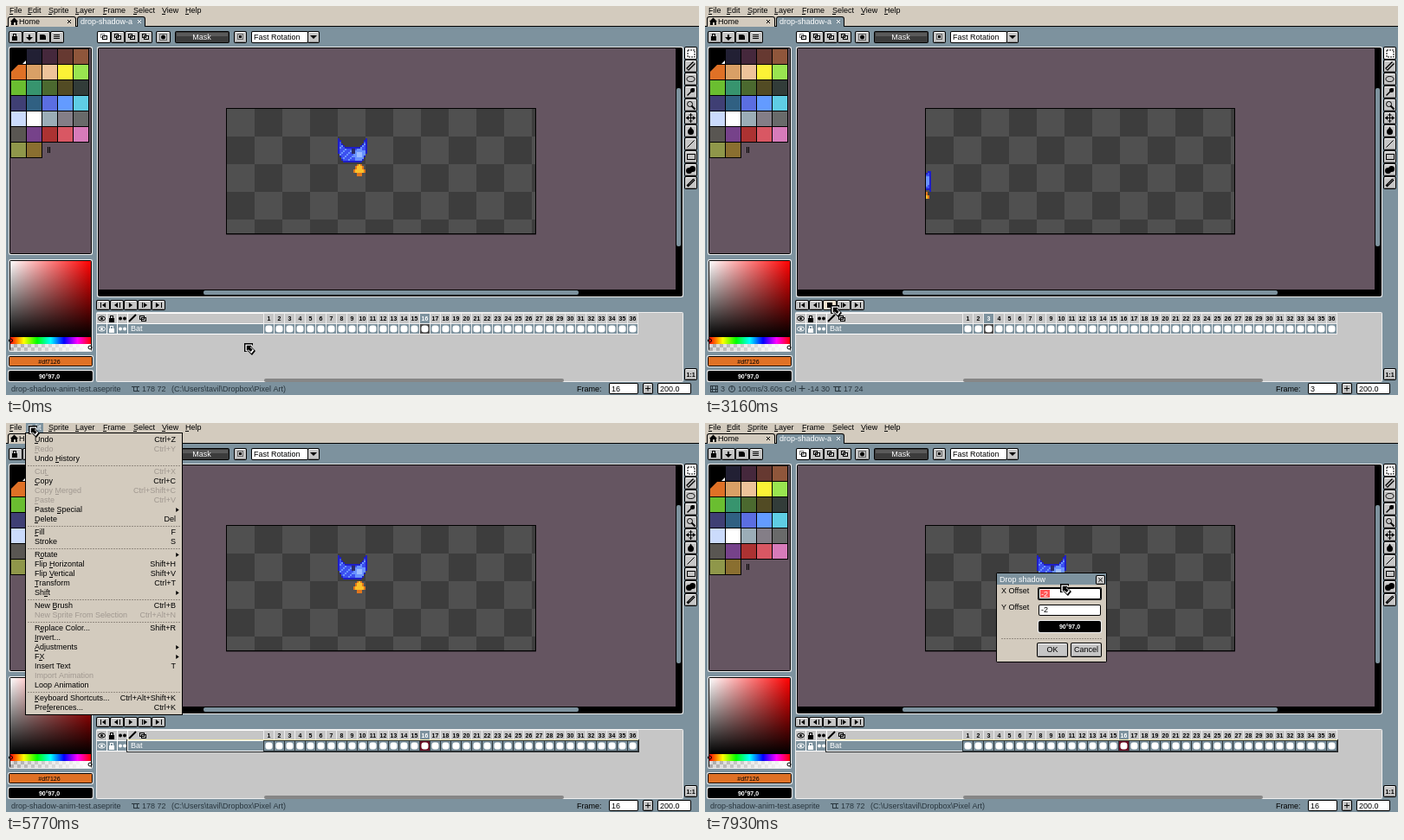
An HTML page with a canvas that plays this animation: 800x450 px, repeating every 7990 ms.

```html
<!DOCTYPE html>
<html lang="en">
<head>
<meta charset="utf-8">
<title>Pixel editor: drop shadow</title>
<style>
html, body { margin: 0; width: 100%; height: 100%; overflow: hidden; background: #7d929e; }
canvas { display: block; width: 800px; height: 450px; }
</style>
</head>
<body>
<canvas id="stage" width="800" height="450"></canvas>
<script>
const LOOP = 7990, PLAY = 998, STOP = 4385, BEAT = 96.6, SELECT = 4850;
const MENU_OPEN = 5560, SUB_OPEN = 6440, MENU_CLOSE = 7200, DIALOG = 7430;
const BLUE = '#7d929e', FACE = '#d3cbbe', GRAY = '#c6c6c6', PLUM = '#655561', INK = '#000', WHITE = '#fff';
const ctx = document.getElementById('stage').getContext('2d');

// Drawing helpers
const mix = (a, b, k) => a + (b - a) * k;
const times = (n, f) => { for (let i = 0; i < n; i++) f(i); };
const rect = (x, y, w, h, c = INK) => { ctx.fillStyle = c; ctx.fillRect(x, y, w, h); };
function text(s, x, y, c = INK, size = 9, align = 'left', weight = '') {
  ctx.font = `${weight} ${size}px "Liberation Sans", Arial, sans-serif`;
  ctx.textAlign = align;
  ctx.fillStyle = c;
  ctx.fillText(s, x, y);
  return ctx.measureText(s).width;
}
const tiny = (s, x, y, c) => text(s, x, y, c, 7, 'center', 'bold');
function round(x, y, w, h, r, c = INK) {
  ctx.fillStyle = c;
  ctx.beginPath();
  ctx.roundRect(x, y, w, h, r);
  ctx.fill();
}
// Raised button
function box(x, y, w, h, face = GRAY) {
  round(x, y, w, h, 2);
  round(x + 1, y + 1, w - 2, h - 2, 1, face);
  if (face === GRAY) {
    rect(x + 2, y + 1, w - 4, 1, WHITE);
    rect(x + 2, y + h - 2, w - 4, 1, '#8c8c8c');
  }
}
// Sunken area: light edge, black edge, content
function well(x, y, w, h, c) {
  round(x, y, w, h, 2, '#eee');
  round(x + 1, y + 1, w - 2, h - 2, 2);
  rect(x + 2, y + 2, w - 4, h - 4, c);
}
function trace(pts) {
  ctx.beginPath();
  for (let i = 0; i < pts.length; i += 2) ctx.lineTo(pts[i], pts[i + 1]);
}
function line(x1, y1, x2, y2, c = INK, w = 1) {
  trace([x1, y1, x2, y2]);
  ctx.strokeStyle = c;
  ctx.lineWidth = w;
  ctx.stroke();
}
function fill(pts, c = INK) { trace(pts); ctx.fillStyle = c; ctx.fill(); }
function oval(x, y, rx, ry, c, hollow) {
  ctx.beginPath();
  ctx.ellipse(x, y, rx, ry, 0, 0, 7);
  ctx.fillStyle = ctx.strokeStyle = c;
  ctx.lineWidth = 1;
  hollow ? ctx.stroke() : ctx.fill();
}
const dot = (x, y, r, c = INK) => oval(x, y, r, r, c);
const ring = (x, y, r, c = INK) => oval(x, y, r, r, c, true);
function frame(x, y, w, h, c = INK, dash = []) {
  ctx.strokeStyle = c;
  ctx.lineWidth = 1;
  ctx.setLineDash(dash);
  ctx.strokeRect(x + .5, y + .5, w - 1, h - 1);
  ctx.setLineDash([]);
}
function gradient(x, y, w, h, across, colors) {
  const g = ctx.createLinearGradient(x, y, across ? x + w : x, across ? y : y + h);
  colors.forEach((c, i) => g.addColorStop(i / (colors.length - 1), c));
  rect(x, y, w, h, g);
}
const dashes = (x, y, w) => times(w / 3, i => rect(x + 3 * i, y, 2, 1, '#948c82'));
// Triangle pointing right (d = 1) or left (d = -1)
const tri = (x, y, r, d = 1, c = INK) => fill([x - r * d * .7, y - r, x + r * d * .7, y, x - r * d * .7, y + r], c);
const drop = (x, y) => fill([x - 4, y, x + 4, y, x, y + 4]);
function plus(x, y, r, c = INK) {
  line(x - r, y, x + r, y, c);
  line(x, y - r, x, y + r, c);
}
function cross(x, y, c = INK) {
  line(x - 2, y - 2, x + 2, y + 2, c);
  line(x + 2, y - 2, x - 2, y + 2, c);
}

// Motion
const isPlaying = t => t >= PLAY && t < STOP;
const frameAt = t => isPlaying(t) ? (16 + Math.floor((t - PLAY) / BEAT)) % 36 + 1 : 16;
const cel = n => ({ x: 6 * n - 32, y: Math.round(Math.min(30, 12.84 + .2857 * (n - 18.75) ** 2)) });
const MOVES = [
  { from: 280, to: 920, x: 145, y: 346 },
  { from: 4430, to: 4800, x: 152, y: 369 },
  { from: 5180, to: 5520, x: 26, y: 3 },
  { from: 5770, to: 6180, x: 129, y: 273 },
  { from: 6650, to: 6880, x: 212, y: 269 },
  { from: 6880, to: 7100, x: 232, y: 300 },
  { from: 7430, to: 7770, x: 410, y: 186 },
];
function pointerAt(t) {
  let x = 275, y = 390;
  for (const m of MOVES) {
    const k = Math.min(1, Math.max(0, (t - m.from) / (m.to - m.from)));
    const ease = k * k * (3 - 2 * k);
    x = mix(x, m.x, ease);
    y = mix(y, m.y, ease);
  }
  return [Math.round(x), Math.round(y)];
}
const pointerHidden = t => (t >= 5000 && t < 5150) || (t >= 7770 && t < 7930);

// Bat: outline follows the wing beat, 0 is raised and 1 is lowered
function makePose(phase) {
  const art = document.createElement('canvas');
  art.width = 17;
  art.height = 24;
  const g = art.getContext('2d');
  const px = (x, y, w, h, c) => { g.fillStyle = c; g.fillRect(x, y, w, h); };
  const beat = phase < 3 ? phase / 2 : (7 - phase) / 5;
  times(17, x => {
    const edge = Math.min(x, 16 - x);
    const inner = Math.min(1, x < 8 ? x / 8 : (16 - x) / 3);
    const head = Math.max(0, 1 - Math.abs(x - 12) / 5);
    const top = Math.round(mix(2 + Math.min(5, 1.3 * edge), 10 - 2 * head, beat));
    const end = Math.round(mix(11 + Math.min(5, 2 * edge), 24 - 8 * inner, beat));
    for (let y = top; y < end; y++) {
      const d = Math.hypot(x - 12, y - mix(11, 12, beat));
      const rim = y === top || y === end - 1 || edge === 0;
      px(x, y, 1, 1, d < 1.6 ? '#9dbcff' : rim ? '#1e1ec8' : d < 3.4 || (x + y) % 4 === 0 ? '#6a93ff' : '#3c50f0');
    }
  });
  px(8, 8, 2, 3, '#2c2c68');
  for (let y = 17; y < 24; y++) {
    const r = y < 22 ? Math.round(1 + (y - 17) * .6) : 1;
    px(12 - r, y, 2 * r + 1, 1, '#e0761c');
    if (y < 22) px(13 - r, y, 2 * r - 1, 1, '#fbc02a');
  }
  return art;
}
const poses = Array.from({ length: 7 }, (_, i) => makePose(i));

// Small icons
function sizeIcon(x, y, c) {
  frame(x + 2, y + 2, 5, 6, c);
  rect(x, y + 2, 9, 1, c);
  rect(x + 5, y + 7, 4, 1, c);
}
function eye(x, y, c) {
  oval(x, y, 4, 2.6, c, true);
  dot(x, y, 1.5, c);
}
function lock(x, y, c = INK) {
  rect(x - 3, y - 1, 6, 5, c);
  frame(x - 2, y - 4, 4, 4, c);
}
const link = (x, y, c) => { dot(x - 2.5, y, 2, c); dot(x + 2.5, y, 2, c); };

function menuBar(open) {
  rect(0, 0, 800, 24, FACE);
  if (open) rect(23, 0, 20, 11, BLUE);
  const items = { File: 4, Edit: 25, Sprite: 49, Layer: 80, Frame: 112, Select: 147, View: 180, Help: 207 };
  for (const [s, x] of Object.entries(items)) {
    const c = open && s === 'Edit' ? WHITE : INK;
    text(s, x, 8, c);
    rect(x, 9, 4, 1, c);
  }
  rect(0, 23, 800, 1);
  [FACE, BLUE].forEach((c, i) => {
    round(2 + 80 * i, 12, 79, 12, [3, 3, 0, 0]);
    round(3 + 80 * i, 13, 77, 11, [2, 2, 0, 0], c);
    cross(73 + 81 * i, 18, i ? WHITE : INK);
  });
  fill([5, 18, 9.5, 13.5, 14, 18]);
  rect(6, 18, 7, 4);
  rect(9, 19, 2, 3, FACE);
  text('Home', 15, 21);
  text('drop-shadow-a', 86, 21, WHITE);
}

function toolBar() {
  times(4, i => box(3 + 16 * i, 29, 16, 14));
  lock(10, 36);
  rect(26, 33, 2, 4);
  drop(27, 36);
  round(39, 33, 7, 6, [0, 3, 0, 0]);
  times(3, i => rect(55, 33 + 2 * i, 7, 1));
  times(4, i => {
    const x = 105 + 16 * i;
    box(x, 29, 16, 14, i ? GRAY : WHITE);
    frame(x + 4, 32, 5, 5, INK, i ? [] : [1, 1]);
    frame(x + 6, 34, 6, 5);
  });
  box(173, 29, 17, 14);
  frame(177, 32, 9, 8, INK, [1, 1]);
  dot(181.5, 36, 2.5);
  box(195, 29, 63, 14, '#3c3c3c');
  rect(197, 31, 59, 4, '#5a5a5a');
  text('Mask', 226, 39, WHITE, 9, 'center');
  box(263, 29, 15, 14);
  frame(267, 32, 7, 7, INK, [1, 1]);
  rect(269, 34, 3, 3);
  box(283, 29, 66, 14, WHITE);
  text('Fast Rotation', 286, 39);
  box(348, 29, 14, 14);
  drop(355, 34);
}

const SWATCHES = ('000000 222034 45283c 663931 8f563b df7126 d9a066 eec39a fbf236 99e550 6abe30 37946e 4b692f 524b24 323c39 ' +
  '3f3f74 306082 5b6ee1 639bff 5fcde4 cbdbfc ffffff 9badb7 847e87 696a6a 595652 76428a ac3232 d95763 d77bba 8f974a 8a6f30').split(' ');
const HUES = Array.from({ length: 7 }, (_, i) => `hsl(${60 * i}, 100%, 50%)`);
function palette() {
  well(3, 47, 97, 241, PLUM);
  SWATCHES.forEach((c, i) => {
    const x = 5 + i % 5 * 18, y = 49 + Math.floor(i / 5) * 18;
    rect(x, y, 19, 19);
    rect(x + 1, y + 1, 17, 17, '#' + c);
  });
  fill([23, 63, 23, 67, 19, 67], WHITE);
  fill([6, 68, 14, 68, 6, 76]);
  rect(48, 163, 1, 7);
  rect(50, 163, 1, 7);

  well(3, 293, 97, 107, INK);
  gradient(5, 295, 93, 88, true, [WHITE, '#f00']);
  gradient(5, 295, 93, 88, false, ['rgba(0,0,0,0)', INK]);
  gradient(5, 383, 93, 8, true, HUES);
  times(46, i => rect(5 + (i >> 1) * 4, 391 + i % 2 * 4, 4, 4, (i + (i >> 1)) % 2 ? '#a8a8a8' : '#d8d8d8'));
  gradient(5, 391, 93, 8, true, ['rgba(255,255,255,0)', WHITE]);
  ring(5.5, 387, 2);
  ring(97, 395, 2);

  well(2, 404, 99, 14, '#df7126');
  text('#df7126', 50, 414, INK, 7, 'center');
  well(2, 421, 99, 14, INK);
  tiny('90°97,0', 50, 431, WHITE);
}

function editor(n) {
  well(105, 47, 677, 290, INK);
  rect(107, 49, 666, 279, PLUM);
  round(774, 95, 5, 183, 2, BLUE);
  round(228, 329, 433, 5, 2, BLUE);
  rect(254, 118, 358, 146);
  rect(254, 264, 358, 1, '#40363e');
  ctx.save();
  ctx.beginPath();
  ctx.rect(255, 119, 356, 144);
  ctx.clip();
  times(60, i => {
    const c = i % 12, r = Math.floor(i / 12);
    rect(255 + 32 * c, 119 + 32 * r, 32, 32, (r + c) % 2 ? '#3d3d3d' : '#505050');
  });
  const p = cel(n);
  ctx.imageSmoothingEnabled = false;
  ctx.drawImage(poses[(n + 5) % 7], 255 + 2 * p.x, 119 + 2 * p.y, 34, 48);
  ctx.restore();
}

// Tool icons are drawn around the centre of their button
const stick = (x, y, w, c) => line(x - 4, y + 4, x + 4, y - 4, c, w);
const TOOLS = [
  (x, y) => frame(x - 4, y - 4, 9, 9, INK, [2, 1]),
  (x, y) => { stick(x, y, 4); stick(x + .5, y - .5, 1.5, GRAY); },
  (x, y) => { oval(x, y, 4.5, 3, INK, true); },
  (x, y) => { stick(x, y, 1.5); dot(x + 2, y - 2, 2.5); },
  (x, y) => { ring(x - 1, y - 1, 3); line(x + 1, y + 1, x + 5, y + 5, INK, 2); },
  (x, y) => { plus(x, y, 5.5); tri(x + 4, y, 2.5); tri(x - 4, y, 2.5, -1); rect(x - 2, y - 4, 4, 1); rect(x - 2, y + 3, 4, 1); },
  (x, y) => { dot(x, y + 1, 3.5); fill([x - 3, y, x, y - 5, x + 3, y]); },
  (x, y) => stick(x, y, 1),
  (x, y) => frame(x - 4.5, y - 3.5, 10, 7),
  (x, y) => { dot(x - 2, y + 1, 3.5); dot(x + 2, y - 1, 3.5); },
  (x, y) => { stick(x, y, 3); stick(x + 2, y - 2, 1, '#777'); },
];
function sideTools() {
  TOOLS.forEach((icon, i) => {
    const y = 47 + 15 * i;
    box(783, y, 15, 15, i ? GRAY : WHITE);
    icon(790.5, y + 7.5);
  });
  box(783, 419, 15, 14);
  tiny('1:1', 790.5, 429);
}

function player(playing) {
  times(5, i => box(104 + 16 * i, 340, 16, 12, playing && i === 2 ? '#f0e2d0' : GRAY));
  const y = 346;
  for (const d of [-1, 1]) {
    const far = 144 + 31 * d, near = 144 + 17 * d;
    tri(far, y, 3, d);
    rect(far + 4 * d, 343, 1, 6);
    tri(near, y, 3, d);
    rect(near - 4 * d, 343, 1, 6);
  }
  if (playing) rect(141, 343, 6, 6);
  else tri(144, y, 3);
}

function timeline(n, selected) {
  well(104, 354, 678, 81, GRAY);
  rect(105, 355, 676, 79, GRAY);
  for (const [y, c] of [[361.5, INK], [373.5, WHITE]]) {
    rect(105, y - 6.5, 193, 13, WHITE);
    for (const [x, w] of [[105, 11], [117, 11], [129, 11], [141, 156]]) rect(x, y - 5.5, w, 11, c === INK ? GRAY : BLUE);
    eye(110.5, y, c);
    lock(122, y + .5, c);
    link(134.5, y, c);
  }
  stick(146, 361, 2);
  times(2, i => frame(154 + 2 * i, 358 + 2 * i, 6, 5));
  rect(297, 355, 433, 25, '#eee');
  if (selected) rect(297, 367, 433, 13, '#30383c');
  for (let i = 1; i <= 36; i++) {
    const x = 286 + 12 * i, on = i === n;
    rect(x, 356, 11, 11, on ? BLUE : GRAY);
    tiny(i, x + 5.5, 364, on ? WHITE : INK);
    rect(x, 368, 11, 11, !on ? BLUE : selected ? '#6a0f24' : '#4a4a4a');
    round(x + 1.5, 369.5, 8, 8, 3, WHITE);
  }
  text('Bat', 144, 376, WHITE);
  if (selected) {
    frame(139, 366, 592, 15, '#25282a');
    rect(140, 366, 590, 1, '#f4ecb0');
  }
  round(298, 431, 346, 4, 2, '#868686');
}

function statusBar(n, playing) {
  const c = '#28353d', y = 446;
  rect(0, 435, 800, 15, BLUE);
  if (playing) {
    frame(6, 439, 9, 8, c);
    frame(8, 439, 5, 8, c);
    rect(6, 443, 9, 1, c);
    let x = 18;
    x += text(n, x, y, c) + 4;
    ring(x + 4, 443, 3.5, c);
    line(x + 4, 440, x + 4, 444, c);
    x += 11;
    x += text('100ms/3.60s Cel', x, y, c) + 3;
    plus(x + 3.5, 442.5, 3.5, c);
    x += 10;
    const p = cel(n);
    x += text(`${p.x} ${p.y}`, x, y, c) + 4;
    sizeIcon(x, 438, c);
    text('17 24', x + 12, y, c);
  } else {
    text('drop-shadow-anim-test.aseprite', 6, y, c);
    sizeIcon(145, 438, c);
    text('178 72', 157, y, c);
    text('(C:\\Users\\tavil\\Dropbox\\Pixel Art)', 191, y, c);
  }
  text('Frame:', 659, y);
  box(696, 436, 34, 13, WHITE);
  text(n, 699, y);
  box(735, 436, 12, 13);
  plus(741, 442.5, 3);
  box(752, 436, 39, 13, WHITE);
  text('200.0', 755, y);
}

// Menus: "-" is a divider, "!" means disabled, "_" marks the shortcut letter, "|" splits off the keys
const EDIT = ['_Undo|Ctrl+Z', '!_Redo|Ctrl+Y', 'Undo _History', '-', '!Cu_t|Ctrl+X', '_Copy|Ctrl+C',
  '!Copy _Merged|Ctrl+Shift+C', '!_Paste|Ctrl+V', 'Paste _Special|>', '_Delete|Del', '-', '_Fill|F', 'Stroke|S', '-',
  'R_otate|>', 'Flip _Horizontal|Shift+H', 'Flip _Vertical|Shift+V', '_Transform|Ctrl+T', 'Sh_ift|>', '-',
  'New _Brush|Ctrl+B', '!New Sprite From Selection|Ctrl+Alt+N', '-', 'R_eplace Color...|Shift+R', '_Invert...',
  '_Adjustments|>', 'F_X|>', 'Insert Text|T', '!Import Animation', 'Loop Animation', '-',
  '_Keyboard Shortcuts...|Ctrl+Alt+Shift+K', 'Pre_ferences...|Ctrl+K'];
const FX = ['_Outline|Shift+O', '_Convolution Matrix...|F9', '_Despeckle (Median Filter)...', 'Drop shadow'];
function menu(items, x, y, w, h, px, py, held) {
  rect(x, y, w, h);
  rect(x + 1, y + 1, w - 2, h - 2, FACE);
  let top = y + 3;
  for (const item of items) {
    if (item === '-') {
      dashes(x + 3, top + 2, w - 6);
      top += 4;
      continue;
    }
    const off = item[0] === '!';
    const [label, keys = ''] = item.slice(off ? 1 : 0).split('|');
    const name = label.replace('_', ''), mark = label.indexOf('_');
    const over = px >= x && px < x + w && py >= top && py < top + 11;
    const hot = !off && (held ? name === held : over);
    if (hot) rect(x + 2, top, w - 4, 11, BLUE);
    const c = off ? '#a09890' : hot ? WHITE : INK, base = top + 8;
    text(name, x + 11, base, c);
    if (mark >= 0) {
      const before = ctx.measureText(name.slice(0, mark)).width;
      rect(Math.round(x + 11 + before), base + 1, 4, 1, c);
    }
    if (keys === '>') tri(x + w - 6, top + 5.5, 2.5, 1, c);
    else text(keys, x + w - 8, base, c, 9, 'right');
    top += 11;
  }
}

function dialog() {
  round(336, 173, 128, 104, 2);
  rect(337, 174, 126, 102, FACE);
  rect(337, 174, 126, 13, BLUE);
  text('Drop shadow', 340, 184, WHITE);
  box(451, 176, 11, 11);
  cross(456.5, 181.5);
  text('X Offset', 342, 197);
  box(384, 190, 74, 15, BLUE);
  box(385, 191, 72, 13, WHITE);
  rect(387, 193, 11, 9, '#ff5555');
  text('-2', 388, 201, WHITE);
  text('Y Offset', 342, 216);
  box(385, 210, 72, 13, WHITE);
  text('-2', 388, 219);
  well(384, 228, 74, 15, INK);
  tiny('90°97,0', 421, 238, WHITE);
  dashes(342, 249, 115);
  box(383, 254, 36, 17);
  text('OK', 401, 265, INK, 9, 'center');
  box(422, 254, 36, 17);
  text('Cancel', 440, 265, INK, 9, 'center');
}

// Arrow with nested outlines
const ARROW = [0, 0, 10, 0, 10, 2, 8, 4, 13, 9, 9, 14, 4, 9, 2, 10, 0, 10];
function pointer(x, y) {
  [INK, WHITE, INK].forEach((c, i) => {
    const k = 1 - .24 * i, inset = 1.4 * i;
    fill(ARROW.map((v, j) => (j % 2 ? y : x) + inset + v * k), c);
  });
}

function draw(t) {
  const n = frameAt(t), playing = isPlaying(t);
  const [x, y] = pointerAt(t);
  const open = t >= MENU_OPEN && t < MENU_CLOSE;
  rect(0, 0, 800, 450, BLUE);
  menuBar(open);
  toolBar();
  palette();
  editor(n);
  sideTools();
  player(playing);
  timeline(n, t >= SELECT);
  statusBar(n, playing);
  if (open) {
    const sub = t >= SUB_OPEN;
    menu(EDIT, 22, 11, 182, 327, x, y, sub && 'FX');
    if (sub) menu(FX, 204, 262, 137, 50, x, y);
  }
  if (t >= DIALOG) dialog();
  if (!pointerHidden(t)) pointer(x, y);
}

const start = performance.now();
function tick() {
  draw((performance.now() - start) % LOOP);
  requestAnimationFrame(tick);
}
tick();
</script>
</body>
</html>
```
